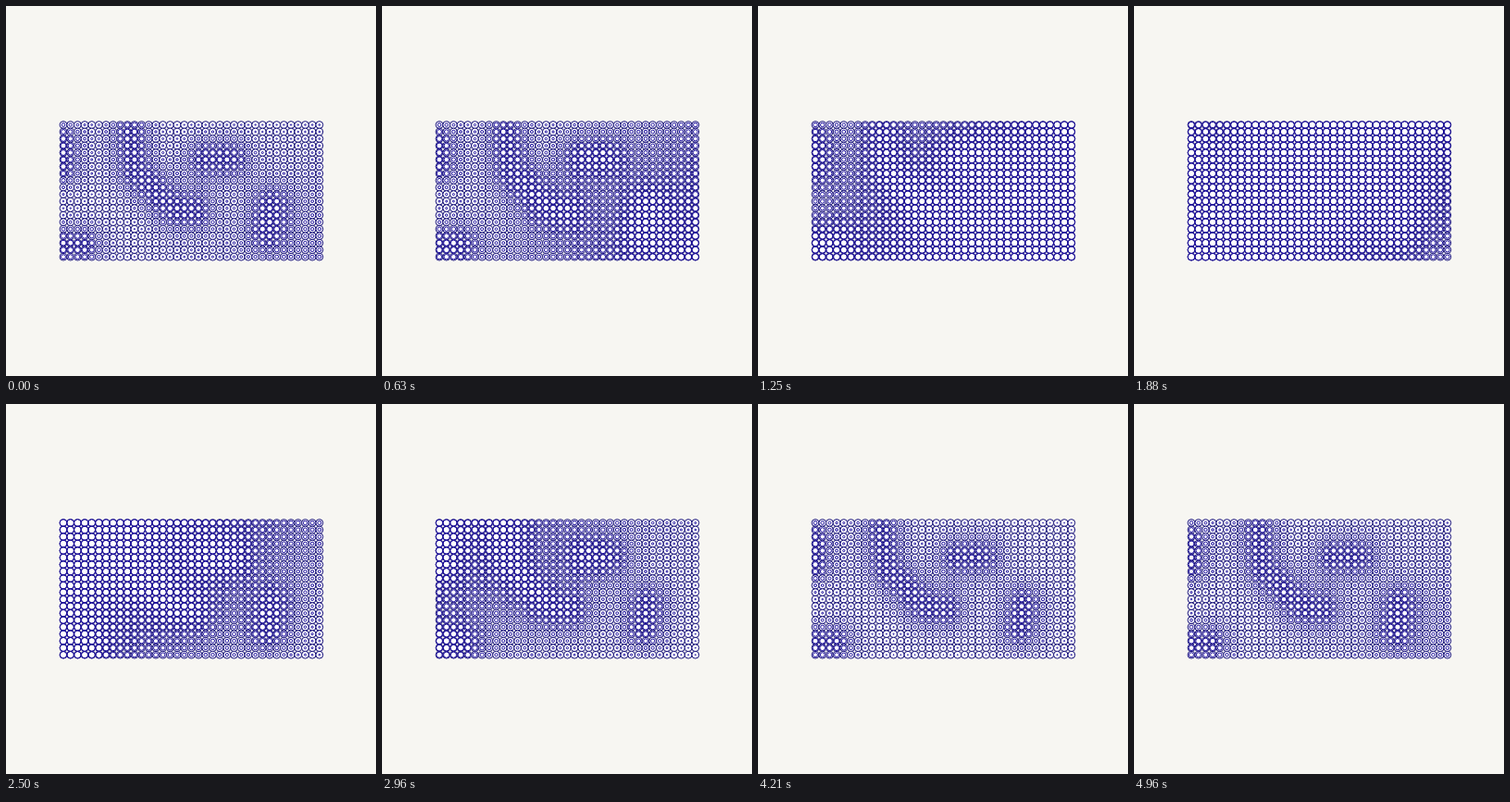
Animation of 400x400 px, one loop 5000 ms. Source, as an HTML page:

```html
<!DOCTYPE html>
<html lang="en">
<head>
<meta charset="utf-8">
<title>Ring wave</title>
<style>
  html, body { margin: 0; width: 100%; height: 100%; overflow: hidden; background: #f7f6f2; }
  svg { display: block; width: 100%; height: 100%; }
</style>
</head>
<body>
<svg viewBox="0 0 400 400" stroke-width="1">
  <g id="outer" fill="#fff" stroke="#140e78"></g>
  <g id="inner" fill="none" stroke="#1a0c9c"></g>
</svg>
<script>
const LOOP = 5000, COLS = 37, ROWS = 20, RADIUS = 3.9;
const SOFTNESS = 18, SPEED = 0.266;
const SVG_NS = 'http://www.w3.org/2000/svg';

// Ridges where the resting rings are large, each a path of a few points
const ridges = [
  [[60, 148], [60, 172]],
  [[62, 259], [82, 259]],
  [[134, 138], [140, 178], [180, 219], [202, 222]],
  [[216, 165], [242, 165]],
  [[287, 217], [283, 242]]
];

function distanceToSegment(x, y, [ax, ay], [bx, by]) {
  const dx = bx - ax, dy = by - ay;
  const along = ((x - ax) * dx + (y - ay) * dy) / (dx * dx + dy * dy);
  const k = Math.min(1, Math.max(0, along));
  return Math.hypot(x - ax - k * dx, y - ay - k * dy);
}

function distanceToPath(x, y, path) {
  return Math.min(...path.slice(1).map((p, i) => distanceToSegment(x, y, path[i], p)));
}

function restSize(x, y) {
  const height = ridges.reduce((sum, path) =>
    sum + Math.exp(-((distanceToPath(x, y, path) / SOFTNESS) ** 2) / 2), 0);
  return 0.12 + 0.64 * Math.min(1, height);
}

function addCircle(parent, x, y, r) {
  const circle = document.createElementNS(SVG_NS, 'circle');
  circle.setAttribute('cx', x.toFixed(2));
  circle.setAttribute('cy', y.toFixed(2));
  circle.setAttribute('r', r);
  return parent.appendChild(circle);
}

const outer = document.getElementById('outer');
const inner = document.getElementById('inner');
const cells = [];
for (let row = 0; row < ROWS; row++) {
  for (let col = 0; col < COLS; col++) {
    const x = 62 + col * 7.69, y = 128.5 + row * 7.51;
    addCircle(outer, x, y, RADIUS);
    cells.push({
      ring: addCircle(inner, x, y, 0),
      rest: restSize(x, y),
      peak: 1400 + (500 - x - y) / SPEED
    });
  }
}

// The wave runs diagonally from the lower right corner.
function draw(time) {
  for (const { ring, rest, peak } of cells) {
    const wave = (0.5 + 0.5 * Math.cos((time - peak) / LOOP * 2 * Math.PI)) ** 2;
    ring.setAttribute('r', (RADIUS * (rest + (1 - rest) * wave)).toFixed(3));
  }
}

const start = performance.now();
function frame() {
  draw((performance.now() - start) % LOOP);
  requestAnimationFrame(frame);
}
draw(0);
requestAnimationFrame(frame);
</script>
</body>
</html>
```
